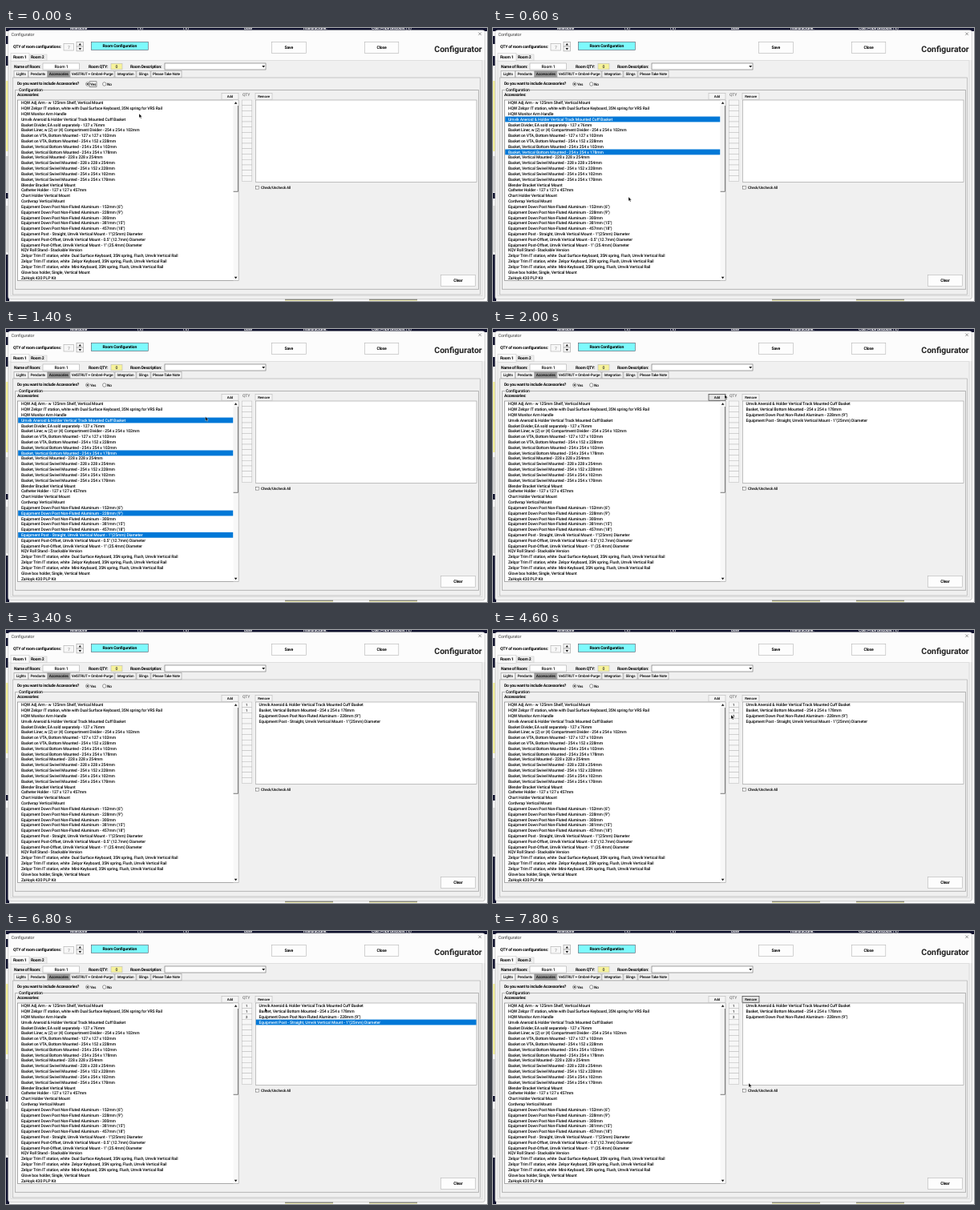
Recreate the animation shown at these times as an HTML page. Size 600 px wide and 341 px high, loop 8 s.

```html
<!DOCTYPE html>
<html lang="en">
<head>
<meta charset="utf-8">
<title>Configurator</title>
<style>
html, body { margin: 0; width: 100%; height: 100%; overflow: hidden; background: #f0f0f0; }
svg { display: block; width: 100vw; height: 100vh; }
text { font: 500 5.1px Roboto, sans-serif; letter-spacing: -.11px; white-space: pre; text-rendering: geometricPrecision; }
.bold { font-weight: 700; letter-spacing: -.19px; }
.tab { font-size: 4.7px; letter-spacing: -.16px; }
.small { font-size: 4.3px; letter-spacing: -.15px; }
.title { font-size: 5.5px; font-weight: 400; letter-spacing: -.15px; }
.heading { font-size: 10.5px; font-weight: 700; letter-spacing: 0; }
</style>
</head>
<body>
<svg viewBox="0 0 600 341" preserveAspectRatio="none">
  <g id="window"></g>
  <g id="live"></g>
</svg>
<script>
const LOOP = 8000, STEP = 200, ROW = 6.825, LIST_TOP = 90;
const NAVY = '#10122f', YELLOW = '#f7f39a', BLUE = '#0078d7', FACE = '#f0f0f0';

const items = [
  'HQW Adj Arm - w 125mm Shelf, Vertical Mount',
  'HQW Zelqor IT station, white with Dual Surface Keyboard, 35N spring for VRS Rail',
  'HQW Monitor Arm Handle',
  'Umvik Aneroid & Holder Vertical Track Mounted Cuff Basket',
  'Basket Divider, EA sold separately - 127 x 76mm',
  'Basket Liner, w (2) or (4) Compartment Divider - 254 x 254 x 102mm',
  'Basket on VTA, Bottom Mounted - 127 x 127 x 102mm',
  'Basket on VTA, Bottom Mounted - 254 x 152 x 228mm',
  'Basket, Vertical Bottom Mounted - 254 x 254 x 102mm',
  'Basket, Vertical Bottom Mounted - 254 x 254 x 178mm',
  'Basket, Vertical Mounted - 228 x 228 x 254mm',
  'Basket, Vertical Swivel Mounted - 228 x 228 x 254mm',
  'Basket, Vertical Swivel Mounted - 254 x 152 x 228mm',
  'Basket, Vertical Swivel Mounted - 254 x 254 x 102mm',
  'Basket, Vertical Swivel Mounted - 254 x 254 x 178mm',
  'Blender Bracket Vertical Mount',
  'Catheter Holder - 127 x 127 x 457mm',
  'Chart Holder Vertical Mount',
  'Cordwrap Vertical Mount',
  'Equipment Down Post Non-Fluted Aluminum - 152mm (6")',
  'Equipment Down Post Non-Fluted Aluminum - 228mm (9")',
  'Equipment Down Post Non-Fluted Aluminum - 300mm',
  'Equipment Down Post Non-Fluted Aluminum - 381mm (15")',
  'Equipment Down Post Non-Fluted Aluminum - 457mm (18")',
  'Equipment Post - Straight, Umvik Vertical Mount - 1"(25mm) Diameter',
  'Equipment Post-Offset, Umvik Vertical Mount - 0.5" (12.7mm) Diameter',
  'Equipment Post-Offset, Umvik Vertical Mount - 1" (25.4mm) Diameter',
  'KQV Roll Stand - Stackable Version',
  'Zelqor Trim IT station, white  Dual Surface Keyboard, 35N spring, Flush, Umvik Vertical Rail',
  'Zelqor Trim IT station, white  Zelqor Keyboard, 35N spring, Flush, Umvik Vertical Rail',
  'Zelqor Trim IT station, white  Mini-Keyboard, 35N spring, Flush, Umvik Vertical Rail',
  'Glove box holder, Single, Vertical Mount',
  'ZaHoyk 430 PLP Kit'
];

// [item index, time it is selected]
const picks = [[3, 200], [9, 400], [20, 800], [24, 1000]];
const ADDED = 1800, REMOVED = 7400;
// [value, time it is entered]
const quantities = [['1', 2600], ['1', 3000], ['2', 4400]];
// [time, x, y]
const pointerPath = [
  [0, 166, 107], [200, 163, 114], [400, 166, 155], [600, 169, 211], [800, 166, 230],
  [1000, 170, 257], [1200, 215, 180], [1400, 248.7, 109.5], [1600, 279, 86], [2000, 289, 82],
  [2400, 296, 92], [2600, 296, 93], [3000, 296, 100], [3200, 296, 101], [4600, 297, 106],
  [5000, 330, 105], [5600, 329.5, 112], [6400, 329, 111], [7000, 320, 89],
  [7200, 318, 84], [7400, 318, 83], [7800, 319, 190]
];

const box = (x, y, w, h, fill = '#fff', stroke = 'none', width = .6) =>
  `<rect x="${x}" y="${y}" width="${w}" height="${h}" fill="${fill}" stroke="${stroke}" stroke-width="${width}"/>`;
const label = (x, y, text, style = '', color = '#000', anchor = 'start') =>
  `<text x="${x}" y="${y}" class="${style}" fill="${color}" text-anchor="${anchor}">${text}</text>`;
const path = (d, fill = 'none', stroke = 'none', width = .6) =>
  `<path d="${d}" fill="${fill}" stroke="${stroke}" stroke-width="${width}"/>`;
const button = (x, y, w, h, text, style = 'bold', fill = '#fdfdfd', stroke = '#b5b5b5') =>
  box(x, y, w, h, fill, stroke) + label(x + w / 2, y + h / 2 + 1.7, text, style, '#000', 'middle');
const smallButton = (x, text, focused) =>
  button(x, 81.5, 21, 7.7, text, 'small', focused ? '#e4e4e4' : '#f4f4f4', focused ? '#222' : '#bbb');
const radio = (x, on) =>
  `<circle cx="${x}" cy="70" r="2.2" fill="#fff" stroke="#444" stroke-width=".55"/>` +
  (on ? `<circle cx="${x}" cy="70" r="1.1" fill="#222"/>` : '');
const range = n => [...Array(n).keys()];

function backdrop() {
  const headings = [[80, 'Milestone'], [164, '(%)'], [221, '(%)'], [297, 'Date'], [371, 'manufacturer.'], [456, 'Cost Price Discount (%)']];
  const leftBands = [[10, 10, NAVY], [35, 12, NAVY], [66, 88, YELLOW],
    [160, 45, '#d5d5d5'], [206, 7, NAVY], [222, 58, '#ddd'], [283, 58, NAVY]];
  return box(0, 0, 600, 341, '#fff') + box(0, 0, 600, 4, NAVY) +
    headings.map(([x, text]) => label(x, 2, text, 'bold', '#fff')).join('') +
    leftBands.map(([y, h, color]) => box(0, y, 4, h, color)).join('') +
    [348, 453].map(x => box(x, 338, 60, 3, '#f4f1bd') + box(x, 338, 60, 1.6, '#444')).join('');
}

function header() {
  return `<rect x="2.7" y="2.7" width="594.8" height="336.1" rx="3" fill="${FACE}" stroke="#aaa" stroke-width=".6"/>` +
    path('M3 40V6q0-3 3-3h588.2q3 0 3 3v34z', '#fcfcfc') +
    label(6.5, 9.7, 'Configurator', 'title', '#444') +
    path('M589.3 5.5l3.6 3.6m0-3.6l-3.6 3.6', 'none', '#444', .55) +
    label(9, 25, 'QTY of room configurations:', 'bold') +
    box(72, 19.5, 12.5, 8.5, '#f7f7f7', '#aaa') + label(78.3, 25.7, '7', '', '#999', 'middle') +
    box(88, 17.3, 8.5, 5.8, '#f5f5f5', '#999') + box(88, 23.1, 8.5, 5.8, '#f5f5f5', '#999') +
    path('M90.6 21.4l1.7-2.3 1.7 2.3zM90.6 25.1l1.7 2.3 1.7-2.3z', '#111') +
    button(106.3, 17.4, 71, 10.1, 'Room Configuration', 'bold', '#7dfafd', '#556') +
    button(331.3, 17.3, 43, 14.3, 'Save') + button(447.3, 17.3, 42.5, 14.3, 'Close') +
    label(593.7, 30, 'Configurator', 'heading', '#222', 'end');
}

function roomPanel() {
  const tabs = [[10, 17.5, 'Lights'], [28, 23.5, 'Pendants'], [52, 27.5, 'Accessories'], [80, 55, 'VelSTRUT + Ombrel-Purge'],
    [136, 26, 'Integration'], [163, 17, 'Slings'], [181, 38, 'Please Take Note']];
  return box(6, 40.7, 588, 294, FACE, '#d4d4d4') +
    box(29, 33, 22, 7.7, FACE, '#ccc') + box(6, 31.5, 23, 9.7, '#f9f9f9', '#ccc') +
    label(9, 37.7, 'Room 1', 'bold') + label(31, 38.3, 'Room 2', 'bold') +
    label(10, 49.7, 'Name of Room:', 'bold') + box(46, 44, 45.5, 8, '#fff', '#aaa') +
    label(69, 50, 'Room 1', '', '#000', 'middle') +
    label(103, 49.7, 'Room QTY:', 'bold') + box(131, 44.3, 14, 7.5, YELLOW, '#bbb') +
    label(138, 50, '0', '', '#333', 'middle') +
    label(155, 49.7, 'Room Description:', 'bold') + box(198, 44, 126, 8, '#fff', '#666') +
    path('M319.3 46.9l1.9 2.5 1.9-2.5z', '#111') +
    box(8.5, 62, 583, 271, FACE, '#a5a5a5') +
    tabs.map(([x, w, text]) => button(x, 53.3, w, 8.5, text, 'tab', text === 'Accessories' ? '#9a9a9a' : '#f4f4f4', '#999')).join('');
}

function scrollbar() {
  return box(283.6, 90.3, 6.1, 225, '#f8f8f8') + box(283.6, 97, 6, 107.3, '#f3f3f3') +
    path('M289.4 97v107.3h-5.8', 'none', '#444', .7) +
    path('M284.8 94.8l1.8-2.5 1.8 2.5zM284.8 310.8l1.8 2.5 1.8-2.5z', '#111');
}

function accessoryPanel() {
  return label(14, 70.7, 'Do you want to include Accessories?', 'bold') +
    radio(101.7, true) + label(105, 71.8, 'Yes', 'tab') + radio(122.7, false) + label(126, 71.8, 'No', 'tab') +
    box(11.3, 77.7, 578.4, 248.5, 'none', '#8c8c8c') + box(15, 76, 31, 4, FACE) +
    label(16, 79.4, 'Configuration') + label(14, 85.2, 'Accessories:', 'bold') +
    box(14.5, LIST_TOP, 275.5, 225.5, '#fff', '#777') + scrollbar() +
    label(295, 85.3, 'QTY', '', '#777') +
    range(15).map(i => box(294.4, LIST_TOP + i * 6.75, 12.4, 6.75, '#f7f7f7', '#bbb', .5)).join('') +
    box(311.3, LIST_TOP, 275.7, 102.3, '#fff', '#999') +
    box(311.6, 197.3, 3.8, 3.8, '#fff', '#555', .5) + label(318, 201.3, 'Check/Uncheck All', 'tab') +
    button(542.3, 308.3, 43, 14.3, 'Clear');
}

function listRow(x, width, index, text, selected) {
  const y = LIST_TOP + .1 + index * ROW;
  return (selected ? box(x, y, width, ROW, BLUE) : '') +
    label(x + 3.7, y + 5.1, text, '', selected ? '#fff' : '#000');
}

function pointer(time) {
  if (time >= 3400 && time < 4600) return '';
  const next = pointerPath.findIndex(point => point[0] > time);
  const b = pointerPath.at(next), a = next > 0 ? pointerPath[next - 1] : b;
  const k = b === a ? 0 : (time - a[0]) / (b[0] - a[0]);
  const x = a[1] + (b[1] - a[1]) * k, y = a[2] + (b[2] - a[2]) * k;
  return `<g transform="translate(${x} ${y})">` +
    path('M0 0v5.2l1.2-1.1.9 2 .9-.4-.9-1.9h1.7z', '#000', '#fff', .35) + '</g>';
}

function live(time) {
  const chosen = picks.filter(([, at]) => time >= at && time < ADDED).map(([index]) => index);
  const added = time < ADDED ? [] : picks.slice(0, time < REMOVED ? 4 : 3);
  const marked = time >= 6000;
  const focusY = LIST_TOP + .4 + 3 * ROW;
  return (time < 200 ? box(104, 66.8, 9, 6.5, 'none', '#333', .5) : '') +
    smallButton(269, 'Add', time >= 1600 && time < 2400) +
    smallButton(311, 'Remove', time >= 7200) +
    items.map((text, i) => listRow(15.2, 268, i, text, chosen.includes(i))).join('') +
    added.map(([index], i) => listRow(311.8, 274.8, i, items[index], marked && i === 3)).join('') +
    (time >= 5400 && time < 6000 ? box(311.8, focusY, 274.8, 6.4, 'none', '#555', .5) : '') +
    quantities.map(([value, at], i) =>
      time >= at ? label(300.2, 95 + i * 6.75, value, 'small', '#222', 'middle') : '').join('') +
    pointer(time);
}

document.getElementById('window').innerHTML = backdrop() + header() + roomPanel() + accessoryPanel();
const liveLayer = document.getElementById('live');
const start = performance.now();
let shown = -1;

function draw() {
  const time = Math.floor((performance.now() - start) % LOOP / STEP) * STEP;
  if (time !== shown) liveLayer.innerHTML = live(shown = time);
  requestAnimationFrame(draw);
}
draw();
</script>
</body>
</html>
```
